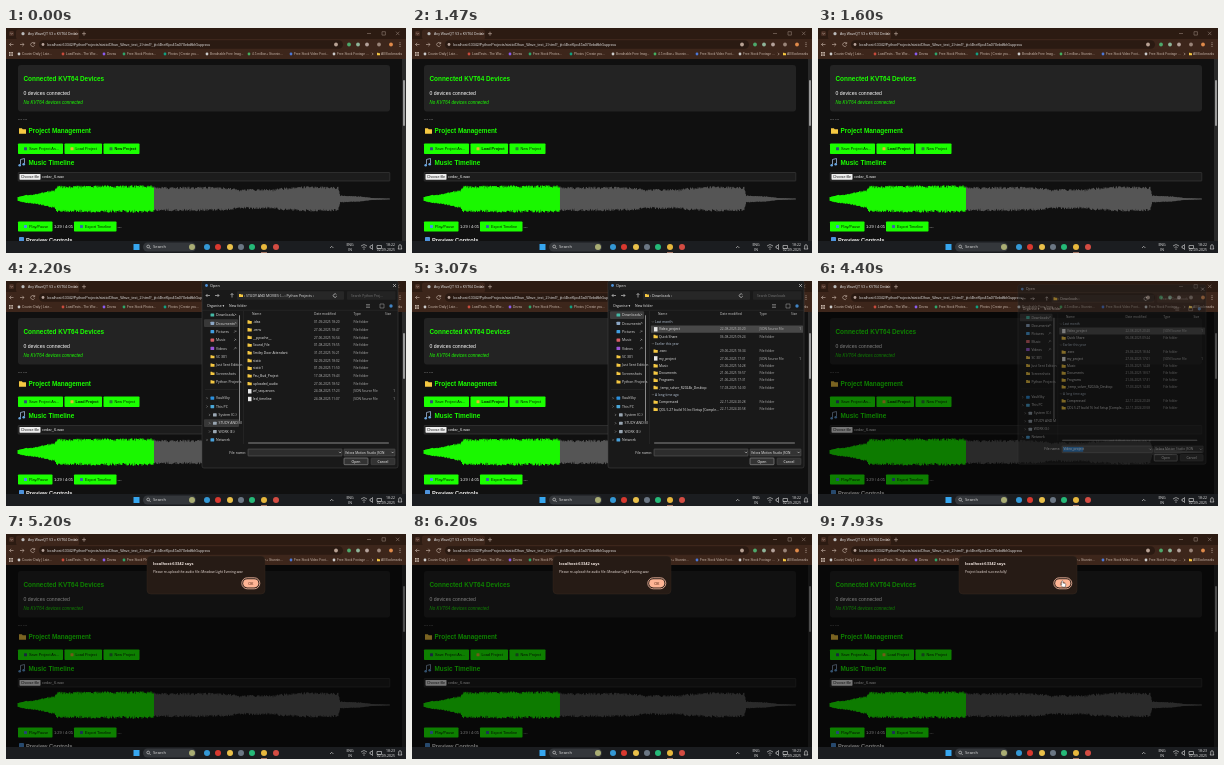
Animation, 400 px wide and 225 px high, one loop 8 s. Source, as an HTML page:

```html
<!DOCTYPE html>
<html lang="en">
<head>
<meta charset="utf-8">
<title>Timeline project loading</title>
<style>
  html, body { margin: 0; width: 100%; height: 100%; overflow: hidden; background: #101010; }
  svg { display: block; width: 100%; height: 100%; font-family: "Liberation Sans", Arial, sans-serif; }
  .ui { font-family: "Open Sans", "Noto Sans", sans-serif; }
</style>
</head>
<body>
<svg id="stage" viewBox="0 0 400 225"></svg>
<script>
const LOOP = 8000;
const GREEN = '#1bff00';
const stage = document.getElementById('stage');

// Shape helpers; text is placed by its vertical centre.
const text = (x, y, size, str, fill = '#fff', attrs = '') =>
  `<text x="${x}" y="${y + size * .35}" font-size="${size}" fill="${fill}" ${attrs}>${str}</text>`;
const rect = (x, y, w, h, fill, r = 0, attrs = '') =>
  `<rect x="${x}" y="${y}" width="${w}" height="${h}" rx="${r}" fill="${fill}" ${attrs}/>`;
const dot = (x, y, r, fill, attrs = '') => `<circle cx="${x}" cy="${y}" r="${r}" fill="${fill}" ${attrs}/>`;
const line = (d, stroke = '#ddd', w = .6) => `<path d="${d}" fill="none" stroke="${stroke}" stroke-width="${w}"/>`;
const group = (id, body, attrs = '') => `<g id="${id}" ${attrs}>${body}</g>`;
const folder = (x, y, s = 1) =>
  `<path transform="translate(${x} ${y}) scale(${s})" d="M0-2h2l.7.7H5V2H0z" fill="#f5c842"/>`;
const BOLD = 'font-weight="700"';
const MIDDLE = 'text-anchor="middle"';
const END = 'text-anchor="end"';

function browser() {
  const bookmarks = [
    [12, 'Courier Daily | Late...', '#ccc'], [56, 'LoadTests - The Wor...', '#c94b3c'],
    [97, 'Devas', '#8a5cf0'], [117, 'Free Stock Photos...', '#2fa66a'],
    [158, 'Photos | Create you...', '#12a081'], [200, 'Breathable Free Imag...', '#ccc'],
    [242, '4.5 million+ Stunnin...', '#45b060'], [284, 'Free Stock Video Foot...', '#4c78d8'],
    [327, 'Free Stock Footage ...', '#ccc']
  ];
  const tools = [[330, '#b8a294'], [343, '#4da96b'], [352, '#8fb59a'], [361, '#b4a29b'], [373, '#9a8579'], [385, '#e08a4a']];
  const tan = '#c9b8ac', faint = '#8f7d72';
  return rect(0, 0, 400, 11, '#2c1b12') + rect(10, 1.5, 63, 10, '#3d261b', 2.5) +
    rect(3, 3, 5, 5, '#4a3025', 1.5) + line('M4.3 5l1.2 1.2L6.7 5', tan) +
    dot(17, 5.7, 1.6, '#bbb') + text(22, 5.7, 3.4, 'Any WaveQT V3 x KVT64 Device', '#ddd') +
    line('M68 4.5l2.4 2.4m0-2.4L68 6.9M76 5.7h4m-2-2v4', tan) +
    line('M361 5.5h4M376 3.7h3.4v3.4H376zM390 3.7l3.4 3.4m0-3.4L390 7.1', faint) +
    rect(0, 11, 400, 20, '#3d261b') + rect(33, 12.2, 304, 8.6, '#2a1a12', 4.3) +
    line('M7.5 16.5h-4m1.7-1.7l-1.7 1.7 1.7 1.7M14 16.5h4m-1.7-1.7l1.7 1.7-1.7 1.7', tan) +
    line('M28.5 15.5a2 2 0 1 0 .1 1.8M28.7 14v1.8H27', tan) + dot(37, 16.5, 1.4, '#b8a49c') +
    text(41, 16.5, 3.7, 'localhost:63342/PythonProjects/static/Dhun_Wave_test_2.html?_ijt=l4hef6po45a070ebdfbh5uppsvu', '#ddd') +
    tools.map(([x, c]) => dot(x, 16.5, 1.9, c)).join('') +
    [14.8, 16.5, 18.2].map(y => dot(394, y, .5, tan)).join('') +
    [3, 5.3].map(x => rect(x, 24, 1.6, 1.6, tan) + rect(x, 26.3, 1.6, 1.6, tan)).join('') +
    bookmarks.map(([x, name, c]) => dot(x + 1, 26, 1.4, c) + text(x + 4, 26, 3.2, name, tan)).join('') +
    line('M366 24.8l1.2 1.2-1.2 1.2', tan) + folder(371, 26, .6) + text(375, 26, 3.3, 'All Bookmarks', tan);
}

function waveform() {
  // Envelope knots: x, half height.
  const knots = [[12, 2], [20, 4], [30, 5], [43, 8], [49, 9], [51, 13], [147, 13.5], [149, 12], [205, 12],
    [226, 11], [232, 9], [245, 10], [268, 9.5], [274, 11], [300, 12.5], [332, 12], [334, 3.5], [355, 2.5], [366, 1], [384, .4]];
  const noise = n => Math.abs(Math.sin(n * 91.7) * 4375.85) % 1;
  const half = x => {
    const i = Math.max(1, knots.findIndex(k => k[0] >= x));
    const [[x0, h0], [x1, h1]] = [knots[i - 1], knots[i]];
    return h0 + (h1 - h0) * (x - x0) / (x1 - x0);
  };
  const bars = (from, to) => {
    let d = '';
    for (let x = from; x < to; x += .5) {
      const up = half(x) * (.8 + .22 * noise(x)), down = half(x) * (.8 + .22 * noise(x + 500));
      d += `M${x} ${(171 - up).toFixed(1)}V${(171 + down).toFixed(1)}`;
    }
    return d;
  };
  return line(bars(148, 384), '#585858', .9) + line(bars(12, 148), GREEN, .9);
}

function page() {
  const button = (id, x, y, w, h, label, icon) =>
    rect(x, y, w, h, GREEN, .8) + rect(x + 6, y + h / 2 - 1.5, 3, 3, icon, .5) +
    text(x + 11, y + h / 2, 3.8, label, '#031f00', `id="${id}"`);
  const note = line('M14.5 136.5v-5l4-1v5', '#9fb8d8', .8) + dot(13.7, 137.2, 1.3, '#68a5e0') + dot(17.7, 136.2, 1.3, '#68a5e0');
  const heading = (x, y, str) => text(x, y, 6.4, str, GREEN, BOLD);
  return rect(0, 31, 400, 182, '#101010') + rect(12, 37, 372, 46.5, '#232323', 3) +
    heading(17.5, 50.5, 'Connected KVT64 Devices') +
    text(17.5, 65.2, 5.1, '0 devices connected') +
    text(17.5, 74.2, 4.5, 'No KVT64 devices connected', GREEN, 'font-style="italic"') +
    text(12, 91, 4, '--- ---', '#ddd') +
    folder(13, 103, 1.4) + heading(22.5, 103, 'Project Management') +
    button('save', 12, 115.5, 45, 10.5, 'Save Project As...', '#35507a') +
    button('load', 58.5, 115.5, 37.5, 10.5, 'Load Project', '#e5b930') +
    button('fresh', 97.5, 115.5, 36, 10.5, 'New Project', '#287f35') +
    note + heading(22.5, 135.2, 'Music Timeline') +
    rect(12.2, 144.5, 371.6, 8.5, '#1c1c1c', .5, 'stroke="#444" stroke-width=".5"') +
    rect(13.5, 146, 21, 5.7, '#eee', .6) + text(24, 148.9, 3.6, 'Choose file', '#111', MIDDLE) +
    text(36, 148.9, 3.9, 'cedar_6.wav', '#eee') + waveform() +
    button('play', 12, 193.5, 34.5, 10, 'Play/Pause', '#4a8fe8') + text(48, 198.5, 4, '1:29 / 4:05') +
    button('export', 68, 193.5, 42.5, 10, 'Export Timeline', '#3a66a8') + text(111.5, 198.5, 4, '---') +
    rect(13, 209, 5, 5, '#4e93dc', .8) + text(20, 211.8, 5.7, 'Preview Controls', '#eee', BOLD) +
    rect(396, 31, 4, 182, '#292929') + rect(397, 52, 2, 46, '#999', 1);
}

function taskbar() {
  const apps = [[201, '#3498d5'], [212, '#d8392f'], [224, '#e9c04a'], [235, '#6b7784'], [246, '#25b978'], [258, '#e7b73c'], [270, '#d34c42']];
  return rect(0, 213, 400, 12, '#1b1d20') + rect(127.5, 216, 6, 6, '#36a6ef') +
    rect(137, 214.5, 53, 9, '#34373b', 4.5) + dot(142.2, 218.5, 1.4, 'none', 'stroke="#ddd" stroke-width=".6"') +
    line('M143.3 219.6l1.4 1.4') + text(147, 219, 4.2, 'Search', '#ddd') + dot(186, 219, 3, '#a9ad74') +
    apps.map(([x, c]) => dot(x, 219, 3, c)).join('') + rect(255, 224, 6, .7, '#dc9a80') +
    line('M324 220l1.7-1.7 1.7 1.7') + text(344, 216.7, 3.5, 'ENG', '#eee', MIDDLE) + text(344, 221.5, 3.5, 'IN', '#eee', MIDDLE) +
    line('M355 218q3-3 6 0M356.5 219.5q1.5-1.4 3 0') + dot(358, 221, .6, '#ddd') +
    line('M364 218h1l1.5-1.5v5L365 220h-1zM371 217.5h4.5v3H371z') +
    text(389, 216.7, 3.5, '18:22', '#eee', END + ' id="clock"') + text(389, 221.5, 3.5, '02-09-2025', '#eee', END) +
    line('M392 221h4l-.7-1v-2a1.3 1.3 0 0 0-2.6 0v2z');
}

const JSON_FILE = 'JSON Source File';
const projectFiles = [
  ['.idea', '01-09-2025 18:20'], ['.venv', '27-06-2025 18:47'], ['__pycache__', '27-06-2025 16:54'],
  ['Sound_File', '01-08-2025 19:55'], ['Smiley Door Attendant', '31-07-2025 16:21'], ['static', '02-09-2025 18:02'],
  ['static1', '01-09-2025 11:50'], ['Yeu_Bud_Project', '17-08-2025 19:43'], ['uploaded_audio', '27-06-2025 18:52'],
  ['wf_sequences', '24-08-2025 17:23', JSON_FILE], ['led_timeline', '24-08-2025 11:07', JSON_FILE]
];
const downloadFiles = [
  ['Last month'], ['Video_project', '22-08-2025 20:20', JSON_FILE], ['Quick Share', '06-08-2025 09:24'],
  ['Earlier this year'], ['.exec', '29-06-2025 18:34'], ['my_project', '27-06-2025 17:01', JSON_FILE],
  ['Music', '23-06-2025 14:28'], ['Documents', '21-06-2025 18:57'], ['Programs', '21-06-2025 17:31'],
  ['_temp_solver_R2024b_Desktop', '17-03-2025 14:30'], ['A long time ago'],
  ['Compressed', '22-11-2024 20:28'], ['QDL 5.27 build 16 Incl Setup [Comple...', '22-11-2024 20:58']
];

function fileRows(files, step) {
  return files.map(([name, date, type = 'File folder'], i) => {
    const y = 41 + i * step;
    if (!date) return line(`M240 ${y - .6}l.9.9.9-.9`, '#aaa', .4) + text(243, y, 3.3, name, '#b9c8da');
    const icon = type === JSON_FILE ? rect(242, y - 2.2, 3.5, 4.4, '#e8e8e8') : folder(241.5, y, .85);
    const size = type === JSON_FILE ? text(389, y, 3.2, '1', '#bbb', END) : '';
    return icon + text(247, y, 3.3, name, '#eee') + text(308, y, 3.2, date, '#bbb') + text(347.5, y, 3.2, type, '#bbb') + size;
  }).join('');
}

function dialog() {
  const quick = [['Downloads', '#45b8a5'], ['Documents', '#8ba6c5'], ['Pictures', '#429ee0'], ['Music', '#d85e67'],
    ['Videos', '#9a55d8'], ['SC 301'], ['Just Sent Edition'], ['Screenshots'], ['Python Projects']];
  const places = [['VaultSky', '#2b91df'], ['This PC', '#4aa7d8'], ['System (C:)', '#9aa7b3'],
    ['STUDY AND M', '#9aa7b3'], ['WORK (E:)', '#9aa7b3'], ['Network', '#49a2dc']];
  const side = (items, top, mark) => items.map(([name, c], i) => {
    const y = top + i * 8.35, indent = /:|AND/.test(name) ? 2.5 : 0;
    return (c ? rect(204.5 + indent, y - 1.6, 3.7, 3.2, c, .6) + mark(y, indent) : folder(204.5, y, .8)) +
      text(210 + indent, y, 3.5, name, '#ddd');
  }).join('');
  const pin = y => line(`M228 ${y + 1}l2-2m-1.2-.4l1.6 1.6`, '#aaa', .5);
  const chevron = (y, indent) => line(`M${200.5 + indent} ${y - 1}l1 1-1 1`, '#aaa', .5);
  const crumb = (path, find) => text(238, 14.5, 3.5, path, '#eee') + text(345, 14.5, 3.3, find, '#777');
  return rect(196, 0, 196, 187, '#191919', 2, 'stroke="#454545" stroke-width=".5"') + rect(196, 0, 196, 9, '#202020', 2) +
    text(204, 4.5, 3.8, 'Open', '#eee') + dot(200.5, 4.5, 1.4, '#4d91d8') + line('M387 3l3 3m0-3l-3 3') +
    line('M204 14.5h-4m1.5-1.5l-1.5 1.5 1.5 1.5M209 14.5h4m-1.5-1.5l1.5 1.5-1.5 1.5M226 16.5v-4m-1.5 1.5l1.5-1.5 1.5 1.5') +
    rect(231, 10.3, 107, 8.5, '#272727', 1) + rect(341, 10.3, 48.5, 8.5, '#232323', 1) + folder(233, 14.5, .8) +
    line('M330.5 13.8a1.7 1.7 0 1 0 .1 1.4') +
    text(201, 25, 3.5, 'Organise ▾', '#eee') + text(223, 25, 3.5, 'New folder', '#eee') +
    line('M360 23.5h4m-4 1.5h4m-4 1.5h4M374 23h4v4h-4z', '#aaa', .5) + dot(385, 25, 1.7, '#4184c4') +
    line('M196 29.3h196M237.5 30v133', '#333', .4) +
    group('sideProjects', rect(198, 38.3, 34, 7.8, '#383838', 1) + rect(198, 138.2, 35, 7.8, '#383838', 1)) +
    group('sideDownloads', rect(198, 30.2, 34, 7.8, '#3b3b3b', 1)) +
    side(quick, 34, pin) + side(places, 117.2, chevron) + line('M199 108.5h33', '#333', .4) +
    rect(233, 34, 1, 106, '#888', .5) + rect(242, 161.6, 141, .9, '#888', .4) +
    [[246, 'Name'], [308, 'Date modified'], [347.5, 'Type'], [379, 'Size']].map(([x, s]) => text(x, 33.3, 3.3, s, '#ccc')).join('') +
    group('projects', crumb('›  STUDY AND MOVIES (...  ›  Python Projects  ›', 'Search Python Proj...') + fileRows(projectFiles, 7.7)) +
    group('downloads', crumb('›  Downloads  ›', 'Search Downloads') +
      rect(239, 44.6, 152, 7.2, '#484848', .6, 'id="fileHover"') + fileRows(downloadFiles, 7.28)) +
    text(240, 171.5, 3.5, 'File name:', '#ddd', END) +
    rect(242, 168, 94, 7, '#2d2d2d', .5, 'stroke="#777" stroke-width=".4"') +
    group('fileName', rect(243, 169, 21, 5, '#1769b5') + text(243.5, 171.5, 3.4, 'Video_project')) +
    rect(338, 168, 51, 7, '#333', .5, 'stroke="#666" stroke-width=".4"') + text(339, 171.5, 3.2, 'Velora Motion Studio JSON', '#eee') +
    line('M333 170.8l1.1 1.1 1.1-1.1M385.5 170.8l1.1 1.1 1.1-1.1') +
    rect(338, 177, 24, 6.7, '#333', .8, 'stroke="#aaa" stroke-width=".5"') + text(350, 180.3, 3.5, 'Open', '#fff', MIDDLE) +
    rect(365, 177, 24, 6.7, '#333', .8, 'stroke="#555" stroke-width=".4"') + text(377, 180.3, 3.5, 'Cancel', '#fff', MIDDLE);
}

function alertBox() {
  return rect(141, 22, 118, 38, '#261b15', 4, 'stroke="#3a2b23" stroke-width=".4"') +
    text(147, 30, 4, 'localhost:63342 says', '#f3e7e1', BOLD) +
    text(147, 38.2, 3.3, '', '#eee2dc', 'id="message"') +
    rect(235.8, 43.8, 18, 11, 'none', 5.5, 'stroke="#ffc2a9" stroke-width=".8"') +
    rect(237.2, 45.2, 15.2, 8.2, '#ffb595', 4.1) + text(244.8, 49.3, 3.8, 'OK', '#4c1d0c', MIDDLE) +
    group('hand', `<path d="M243.7 47q.7-.7 1.3 0v2l2 .4q1 .3.8 1.4l-.5 2.3h-2.8l-2-2.4q.5-.8 1.2 0z" fill="#fff" stroke="#222" stroke-width=".4"/>`);
}

stage.innerHTML = page() + rect(0, 31, 400, 182, '#000', 0, 'id="dim"') + browser() +
  group('dialog', dialog(), 'class="ui"') + group('alert', alertBox(), 'class="ui"') + group('taskbar', taskbar(), 'class="ui"');

const $ = id => document.getElementById(id);
const show = (id, on) => $(id).setAttribute('visibility', on ? 'inherit' : 'hidden');
const fade = (id, opacity) => $(id).setAttribute('opacity', opacity);
const ramp = (t, from, to) => Math.min(1, Math.max(0, (t - from) / (to - from)));

function render(t) {
  const hovered = t < 600 ? 'fresh' : t < 4700 ? 'load' : '';
  for (const id of ['fresh', 'load']) $(id).setAttribute('font-weight', id === hovered ? 700 : 400);

  const opening = ramp(t, 1830, 2000), closing = ramp(t, 4330, 4470);
  const visible = opening * (1 - closing);
  const scale = 1 - .08 * (1 - visible);
  fade('dialog', visible);
  $('dialog').setAttribute('transform', `translate(294 93.5) scale(${scale}) translate(-294 -93.5)`);

  const inDownloads = t >= 2670;
  show('projects', !inDownloads);
  show('sideProjects', !inDownloads);
  show('downloads', inDownloads);
  show('sideDownloads', inDownloads);
  show('fileHover', t >= 2930);
  show('fileName', t >= 3530);

  fade('dim', .5 * ramp(t, 4300, 4400));
  const loaded = t >= 6800;
  fade('alert', loaded ? ramp(t, 6870, 7000) : ramp(t, 4470, 4600) * (1 - ramp(t, 6730, 6800)));
  $('message').textContent = loaded ? 'Project loaded successfully!' : 'Please re-upload the audio file: Meadow Light Evening.wav';
  show('hand', t >= 7600);
  $('clock').textContent = t < 5000 ? '18:22' : '18:23';
}

function tick() {
  render(performance.now() % LOOP);
  requestAnimationFrame(tick);
}
tick();
</script>
</body>
</html>
```
